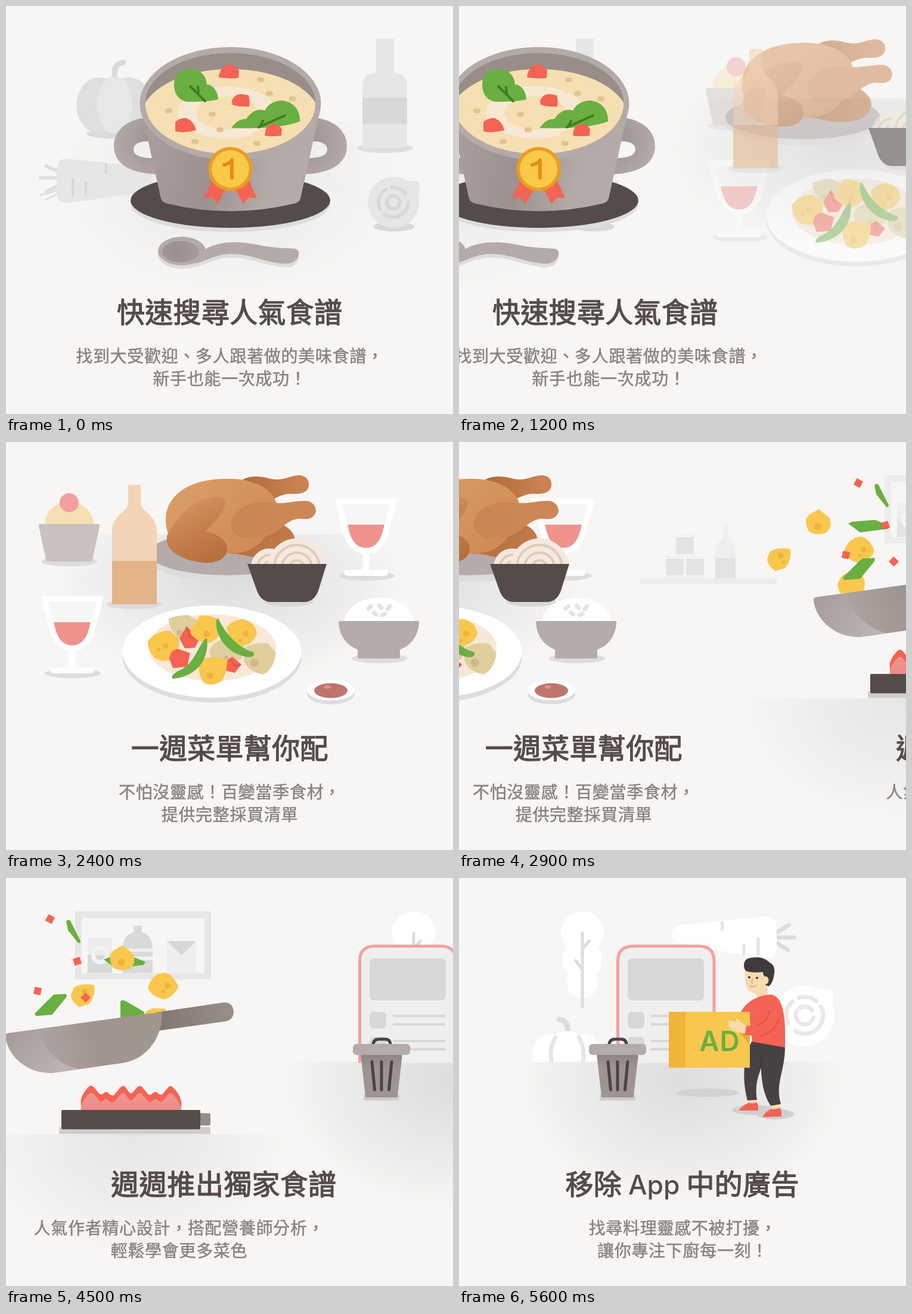
Write an HTML page with a canvas that moves like this. It is 750 px wide and 686 px high and loops after 6000 ms.

```html
<!DOCTYPE html>
<html lang="zh-Hant">
<head>
<meta charset="utf-8">
<style>
html, body { margin: 0; width: 100%; height: 100%; overflow: hidden; background: #f7f6f4; }
canvas { display: block; }
</style>
</head>
<body>
<canvas id="stage" width="750" height="686"></canvas>
<script>
const W = 750, H = 686, LOOP = 6000, BG = '#f7f6f4';
const DARK = '#554c49', TAUPE = '#b4aaa7', RED = '#f46353', GREEN = '#6aaf41', YELLOW = '#f9c74e', GOLD = '#eeb43c', SHADE = '#dddcde';
const CJK = '"Noto Sans CJK TC", "Noto Sans CJK", sans-serif';
const stage = document.getElementById('stage').getContext('2d');
let c = stage;

// Drawing helpers
function fill(d, color) { c.fillStyle = color; c.fill(new Path2D(d), 'evenodd'); }
function line(d, color, width, cap = 'round') {
  c.strokeStyle = color; c.lineWidth = width; c.lineCap = cap; c.lineJoin = 'round';
  c.stroke(new Path2D(d));
}
function oval(x, y, rx, ry, color) {
  c.fillStyle = color; c.beginPath(); c.ellipse(x, y, rx, ry, 0, 0, 7); c.fill();
}
const dot = (x, y, r, color) => oval(x, y, r, r, color);
function box(x, y, w, h, color, r = 0) {
  c.fillStyle = color; c.beginPath(); c.roundRect(x, y, w, h, r); c.fill();
}
function arc(x, y, r, from, to, color, width) {
  c.strokeStyle = color; c.lineWidth = width; c.lineCap = 'round';
  c.beginPath(); c.arc(x, y, r, from, to); c.stroke();
}
function stops(g, colors) {
  colors.forEach((s, i) => g.addColorStop(i / (colors.length - 1), s));
  return g;
}
const lin = (x0, y0, x1, y1, ...colors) => stops(c.createLinearGradient(x0, y0, x1, y1), colors);
const rad = (x, y, r, ...colors) => stops(c.createRadialGradient(x, y, 0, x, y, r), colors);
function at(x, y, draw) { c.save(); c.translate(x, y); draw(); c.restore(); }
function clipBox(x, y, w, h, draw) {
  c.save(); c.beginPath(); c.rect(x, y, w, h); c.clip(); draw(); c.restore();
}
function floor(top, cy, rx, ry, tone) {
  clipBox(0, top, W, H - top, () => at(375, cy, () => {
    c.scale(rx, ry);
    dot(0, 0, 1, rad(0, 0, 1, `rgba(${tone},1)`, `rgba(${tone},.55)`, `rgba(${tone},0)`));
  }));
}
// The bold parameter thickens regular glyphs by an outline of that width
function text(s, x, y, size, color, { space = 0, align = 'center', family = CJK, weight = 400, bold = 0 }) {
  c.font = `${weight} ${size}px ${family}`;
  c.letterSpacing = space + 'px';
  c.textAlign = align;
  c.fillStyle = c.strokeStyle = color;
  c.lineWidth = bold; c.lineJoin = 'round';
  c.fillText(s, x, y);
  if (bold) c.strokeText(s, x, y);
}
const TITLE = { space: 0.3, bold: 1.3 };
const title = s => () => text(s, 375.2, 532, 47, DARK, TITLE);
const lines = (a, b) => () => [a, b].forEach((s, i) =>
  text(s, 375.5, 598.5 + i * 38.5, 28, '#8a817e', { space: 0.7, bold: 0.5 }));

// Search slide
function greyFood() {
  oval(185, 215, 50, 8, '#dadada');
  oval(157, 167, 39, 47, '#dfdfdf');
  oval(206, 167, 39, 47, '#dfdfdf');
  oval(182, 166, 30, 48, '#e7e7e7');
  line('M182 116Q181 97 197 95', '#dadada', 9);
  line('M86 277L67 269M86 289H58M86 303L68 312', '#dedede', 6);
  line('M86 310L58 318M86 316L66 326', '#dedede', 3);
  fill('M104 257L245 272V311L106 331Q85 333 85 312V276Q86 255 104 257Z', '#e6e6e6');
  line('M112 291V319M134 297V317M168 266V281', '#d8d8d8', 4);
  oval(636, 239, 47, 8, '#dedede');
  fill('M621 55H651V112Q673 114 673 134V238H598V134Q598 114 621 112Z', '#e6e6e6');
  box(598, 154, 75, 44, '#d8d8d8');
  oval(651, 371, 35, 8, '#d9d9d9');
  dot(650, 330, 43, '#e6e6e6');
  fill('M660 295L691 294Q695 296 693 318Z', '#e6e6e6');
  const ring = '#d8d8d8';
  arc(650, 330, 25, 2.7, 4.2, ring, 6); arc(650, 330, 25, 4.6, 5.7, ring, 6); arc(650, 330, 25, 0, 2.2, ring, 6);
  arc(650, 330, 11, -0.2, 3.6, ring, 6); arc(650, 330, 11, 4.1, 5.6, ring, 6);
}
function spoonShape(dy, color) {
  at(0, dy, () => {
    oval(295, 412, 40, 24, color);
    fill('M320 396L334 409C360 393 398 396 425 402C450 407 470 407 484 408Q493 409 491 419Q485 435 465 433C430 430 410 416 375 417C350 418 338 428 318 433Z', color);
  });
}
function spoon() {
  spoonShape(6, SHADE);
  spoonShape(0, TAUPE);
  oval(293, 413, 31, 18, rad(285, 414, 34, '#998e8b', '#a59a97'));
}
function soup() {
  oval(376.5, 334, 167, 46, SHADE);
  oval(376.5, 327, 167.5, 46, DARK);
  const handle = 'M252 187C207 185 181 208 181 235C181 266 209 283 260 283ZM245 228C224 226 214 232 214 241C214 251 226 256 250 256Z';
  const grip = () => fill(handle, rad(255, 225, 75, '#998e8b', TAUPE));
  grip();
  at(753, 0, () => { c.scale(-1, 1); grip(); });
  fill('M226 170L260 324Q262 330 270 332Q376 358 484 332Q492 330 494 324L528 170Z', lin(245, 250, 440, 290, '#a89d9a', '#9c918e', TAUPE));
  oval(376.5, 164, 152, 95, TAUPE);
  c.save();
  c.beginPath(); c.ellipse(376.5, 164, 143, 85, 0, 0, 7); c.clip();
  box(220, 70, 320, 190, '#998d89');
  oval(376.5, 188, 150, 82, '#f5dfb3');
  oval(371, 179, 83, 44, '#f7e8d3');
  oval(371, 180, 52, 28, '#f5dfb3');
  fill('M410 214Q444 202 455 182L470 205L430 230Z', '#f5dfb3');
  [[427, 124], [442, 147], [481, 156], [273, 176], [346, 182], [359, 208], [317, 228], [421, 231]]
    .forEach(([x, y]) => box(x - 6, y - 4, 12, 8, '#e2c48b', 4));
  c.restore();
  fill('M282 133C282 116 293 106 309 106C325 106 336 116 337 132C348 132 356 145 356 157C342 161 320 161 303 161C290 158 282 148 282 133Z', GREEN);
  line('M309 135L334 160M322 136L323 146', '#3f7d22', 4);
  fill('M378 205C388 192 395 190 403 190C412 176 425 172 434 176C440 164 452 159 463 159C485 161 494 178 493 194C470 203 430 207 378 205Z', GREEN);
  line('M468 184L424 204M431 193L426 203', '#3f7d22', 4);
  ['M357 120C358 108 366 98 375 98Q388 102 391 109L390 121Q374 123 357 120Z',
   'M379 159Q384 148 394 148L407 150Q410 160 408 169Q392 170 380 166Z',
   'M284 195Q290 189 302 188Q316 194 319 209Q300 214 284 211Z',
   'M435 211Q437 200 448 198Q459 199 463 207L462 218Q447 220 434 218Z'].forEach(d => fill(d, RED));
  const ribbon = () => fill('M345 294L332 323L346 322L355 333L372 300Z', RED);
  ribbon();
  at(753, 0, () => { c.scale(-1, 1); ribbon(); });
  dot(376.5, 274, 37, '#e99d20');
  dot(376.5, 274, 31.5, '#fac94a');
  line('M366 267Q376 265 379 259V289', '#e58d14', 6);
}

// Menu slide
function chicken() {
  oval(370, 197, 130, 38, SHADE);
  oval(370, 187, 130, 37, '#b5abaa');
  fill('M390 70C400 55 425 56 445 62C465 66 475 57 490 56C504 56 509 64 508 74C506 85 495 88 480 87C460 86 445 100 425 106Z', lin(410, 80, 490, 70, '#b46c3c', '#c98250'));
  fill('M375 180C385 140 420 130 450 134C475 140 486 155 485 168C480 190 455 196 430 195C408 195 395 186 375 188Z', lin(400, 140, 480, 190, '#b46c3c', '#c47d4b'));
  fill('M268 130C268 95 300 63 365 62C415 60 448 78 455 106L440 150C425 180 400 190 365 187L330 200C300 200 268 170 268 130Z', lin(300, 80, 400, 190, '#d99c66', '#cf8b56'));
  fill('M377 138C385 105 420 97 445 102C470 105 480 99 500 99C512 98 520 106 520 116C518 128 508 131 495 129C470 127 460 155 430 160C395 167 377 155 377 138Z', lin(385, 150, 500, 105, '#cb8553', '#cd8757'));
  fill('M270 158C285 125 320 92 350 92C368 92 371 100 366 110C358 130 338 145 335 150C355 155 372 165 371 180C370 200 345 206 325 202C300 199 265 185 270 158Z', lin(300, 110, 345, 200, '#d1905c', '#c47d4a', '#b76e3d'));
}
function bottleAndBowl() {
  oval(215, 273, 47, 8, SHADE);
  fill('M205 72H226V102C226 118 253 122 253 150V273H178V150C178 122 205 118 205 102Z', '#f3d4b6');
  box(178, 200, 75, 73, '#e3b389');
  oval(474, 268, 42, 9, '#d8d6d9');
  clipBox(400, 155, 140, 51, () => {
    [[442, 210, 31, 20, 9], [488, 211, 49, 38, 25, 12]].forEach(([x, y, r, ...rings]) => {
      dot(x, y, r, '#f4e9df');
      rings.forEach(q => arc(x, y, q, 0, 7, '#dfcbb6', 4));
    });
  });
  fill('M405 205H538L524 250Q517 269 500 269H445Q428 269 421 250Z', DARK);
}
function plate() {
  oval(345.5, 361, 150, 77, SHADE);
  oval(345.5, 352.5, 150, 77.5, '#fff');
  oval(346, 346, 107, 56, '#f7e8d7');
  ['M273 297Q290 290 306 291L322 300L318 330Q300 340 285 325Q272 312 273 297Z',
   'M341 351Q350 332 372 330L400 340L395 365Q375 372 345 366Z',
   'M400 346Q420 335 440 339L453 355Q448 385 430 391Q405 385 399 367Z'].forEach(d => fill(d, '#e1ce9d'));
  [[291, 321, 5], [417, 371, 7], [370, 363, 4]].forEach(([x, y, r]) => dot(x, y, r, '#cfb98a'));
  fill('M291 330L303 310L325 330L317 346L300 347Z', RED);
  line('M303 311L309 329L322 331', '#dd5146', 2);
  ['M238 335Q250 318 275 317L290 330Q292 355 280 365Q262 372 248 362Q238 350 238 335Z',
   'M309 319L325 292Q345 290 358 300Q365 330 340 338Q315 335 309 319Z',
   'M370 312Q380 298 398 298Q418 303 421 322Q415 340 395 343Q375 340 370 312Z'].forEach(d => fill(d, YELLOW));
  fill('M274 364Q276 348 290 348L309 355L304 378L280 380Z', RED);
  fill('M364 372L380 361L395 374L384 388L366 384Z', RED);
  line('M376 365L383 376L393 375', '#dd5146', 2);
  fill('M323 375Q330 360 350 362L371 366Q372 385 362 402Q345 412 332 405Q324 395 323 375Z', YELLOW);
  [[268, 343, 5], [256, 349, 3.5], [337, 323, 6], [402, 322, 5], [393, 334, 3], [342, 393, 6]]
    .forEach(([x, y, r]) => dot(x, y, r, GOLD));
  fill('M337 330C342 365 320 395 279 398C276 392 284 387 295 382C315 372 322 345 334 331Z', GREEN);
  fill('M356 296C365 318 390 348 415 353C420 362 408 364 395 359C365 350 350 320 353 299Z', GREEN);
  oval(545, 424, 40, 17, SHADE);
  oval(545, 417.5, 40, 17, '#fff');
  oval(545, 418, 28, 12.5, '#bd756c');
  oval(539, 412, 5.5, 3, '#d59a92');
}
function glass() {
  oval(605, 225, 47, 8, SHADE);
  fill('M557 100H651L638 150Q630 183 604 183Q578 183 570 150Z', BG);
  fill('M573 139H635Q628 179 604 179Q580 179 573 139Z', '#f0938d');
  line('M557 100H651L638 148Q630 183 604 183Q578 183 570 148Z', '#fff', 10);
  line('M604 183V218', '#fff', 11);
  line('M572 220H636', '#fff', 10);
}
function tableware() {
  oval(106, 201, 47, 8, SHADE);
  clipBox(0, 0, W, 140, () => oval(106, 139, 41, 39, '#f5e0b3'));
  dot(106, 102, 16, '#f39f9d');
  fill('M57 138H155Q158 138 157 142L145 198Q144 201 141 201H71Q68 201 67 198L55 142Q55 138 57 138Z', '#cac2c0');
  glass();
  at(-493, 164, glass);
  oval(627, 364, 47, 8, SHADE);
  clipBox(0, 0, W, 302, () => oval(626, 302, 58, 40, '#fff'));
  line('M608 280L612 276M626 275L630 279M640 281L644 276M617 287L621 290M631 291L636 289', '#e4e3e5', 7);
  fill('M558 304Q558 301 561 301H691Q694 301 693 306C690 333 673 345 661 349V361Q661 364 658 364H593Q590 364 590 361V349C575 343 560 330 558 304Z', '#b5abaa');
}

// Weekly slide
function jar(x, y) {
  box(x, y, 30, 37, '#efefef');
  box(x, y + 5, 30, 27, '#dadada');
  box(x, y + 5, 30, 2, '#cfcfcf');
}
function shelves() {
  jar(116, 156); jar(99, 192); jar(133, 192);
  fill('M195 137H204V156C204 165 216 168 216 182V229H182V182C182 168 195 165 195 156Z', '#ececec');
  box(182, 195, 34, 34, '#d8d8d8');
  box(56, 229, 229, 9.5, '#e6e6e6');
  box(466, 56, 228, 114.5, '#e7e7e7');
  box(477, 67, 206, 93.5, '#f7f6f5');
  box(487, 101, 41, 59, '#ececec');
  box(487, 129, 41, 31, '#d9d9d9');
  dot(508, 130, 15, '#f4f4f4');
  dot(508, 130, 8, '#d9d9d9');
  box(499, 121, 18, 9, '#ececec');
  fill('M564 80H578V91Q596 97 596 118V160H546V118Q546 97 564 91Z', '#dadada');
  box(546, 119, 50, 5, '#f0f0f0'); box(546, 132, 50, 6, '#f0f0f0');
  box(620, 106, 49, 54, '#eeeeee');
  fill('M620 106H669L645 130Z', '#d8d8d8');
}
const backBean = () => fill('M256 137L263 134L301 131L326 141L323 146L276 152Z', GREEN);
function squash() {
  ['M297 130L303 122L319 113L337 128Q342 145 330 153Q312 158 302 150Q297 142 297 130Z',
   'M237 184Q250 176 271 180Q273 200 262 212L246 217Q232 208 232 196Z',
   'M361 185Q368 160 390 159Q405 163 412 183Q405 200 388 204Q368 200 361 185Z',
   'M350 240Q355 222 370 219L391 220L396 236L394 254H354Z'].forEach(d => fill(d, YELLOW));
  [[317, 142, 6], [255, 191, 5], [259, 202, 3], [394, 181, 5], [387, 191, 3]]
    .forEach(([x, y, r]) => dot(x, y, r, GOLD));
}
function pan() {
  ['M337 73Q340 68 344 72L361 106Q361 111 357 109L340 88Z',
   'M284 228L316 196L337 195Q339 198 336 202L313 230L286 232Z',
   'M428 207Q432 204 437 207L468 225L466 240H428Z'].forEach(d => fill(d, GREEN));
  [[310, 69, 0.5], [355.5, 140, -0.3], [289, 190, 0.2], [369.5, 201, 0.75]].forEach(([x, y, a]) =>
    at(x, y, () => { c.rotate(a); box(-6, -6, 12, 12, RED); }));
  fill('M488 226L600 209.5Q616 208 618 224Q618 238 605 241L490 257Z', lin(500, 0, 610, 0, '#837873', '#988d87'));
  fill('M235 265Q235 262 239 261L497 225C501 262 475 305 432 311L320 327C275 333 238 300 235 265Z', lin(300, 290, 480, 250, '#aca2a0', '#a0958f', '#a2978f'));
  fill('M235 265Q235 262 239 261L292 254C298 288 322 312 358 321.5L320 327C275 333 238 300 235 265Z', lin(250, 260, 330, 325, '#a89d9a', '#bbb4b1'));
}
function stove() {
  const flame = 'M289 405V390Q284 375 289 366Q295 355 301 350Q304 348 308 351L317 362Q321 366 326 361Q329 358 333 362Q338 367 342 365L354 351Q357 348 361 351L368 361Q370 363 373 361L382 351Q385 348 389 351L400 364Q404 366 408 361Q412 358 415 361Q421 367 424 363L434 351Q437 348 441 352Q460 370 454 390V405Z';
  clipBox(0, 0, W, 392, () => {
    fill(flame, RED);
    at(0, 12, () => fill(flame, lin(0, 350, 0, 380, '#ee9590', '#f08a87')));
  });
  box(250, 419, 254, 11.5, '#cfcdcd', 2);
  box(484, 395.5, 20, 20.5, '#978c87', 2);
  box(254, 390, 233, 32.5, DARK, 2);
}

// Ad-free slide
function whiteFood() {
  const grey = '#dcdcdc';
  dot(207, 92, 36, '#fff'); dot(207, 137, 33, '#fff'); dot(207, 176, 26, '#fff');
  line('M207 93V216M207 120L218 106M207 154L196 139', grey, 5);
  line('M533 92L553 79M533 100H562M533 109L552 121', grey, 7);
  fill('M372 79L510 65Q533 63 533 85V118Q532 139 512 136L372 110Q357 107 357 95Q357 82 372 79Z', '#fff');
  line('M441.500 73V88M478 111V130M502 100V130', '#e4e4e4', 5, 'butt');
  line('M182 260Q184 239 168 238', grey, 9);
  clipBox(0, 0, W, 309, () => {
    oval(151, 303, 28, 41, '#fff'); oval(181, 302, 36, 45, '#fff'); oval(211, 303, 27, 41, '#fff');
    line('M162 268Q149 290 157 315M201 268Q214 290 206 315', '#e6e6e6', 7);
  });
  dot(579, 232, 51, '#fff');
  fill('M595 188L626 187Q630 189 626 220Z', '#fff');
  const ring = '#e9e9e9';
  arc(580, 231, 31, -0.5, 2.1, ring, 7); arc(580, 231, 31, 2.7, 4, ring, 7); arc(580, 231, 31, 4.4, 5.4, ring, 7);
  arc(580, 231, 15, 0.2, 3.7, ring, 7); arc(580, 231, 15, 4.2, 5.7, ring, 7);
}
function phone() {
  const frame = 'M266.500 311V140Q266.500 114.500 292 114.500H402Q428 114.500 428 140V311';
  fill(frame, '#efefef');
  box(283, 135, 128, 71, '#d8d8d8', 8);
  [225, 267].forEach(y => {
    box(283, y, 28, 28, '#d8d8d8', 7);
    line(`M322 ${y + 7}H410M322 ${y + 21}H410`, '#d8d8d8', 4, 'butt');
  });
  line(frame, '#f4a19f', 5, 'butt');
}
function trash() {
  box(236, 364, 60, 10, '#cfcdcd', 2);
  line('M252 281Q252 271 262 271H272Q281 271 281 281', '#4a4341', 5);
  fill('M231 296H301L293 367Q293 369 290 369H242Q239 369 239 367Z', lin(0, 297, 0, 320, '#8f8481', '#9f9491'));
  box(218, 279, 96, 18.5, '#b5abaa', 6);
  line('M250 309L254.500 356M266 309V356M283 309L278.500 356', '#4c4442', 5);
}
function man() {
  const skin = '#f9dbb0', trousers = '#474142', hair = '#3f3a3b';
  oval(417, 361, 53, 7, '#d2d2d4');
  oval(495, 390, 37, 8.5, '#d0d0d2');
  oval(531, 397, 31, 9, '#d0d0d2');
  fill('M486 372L499 372L500 381H487ZM522 381L538 379L539 390H525Z', skin);
  fill('M470 391Q472 384 486 378Q494 380 500 377Q503 385 502 391Z', RED);
  fill('M510 402Q512 394 524 388Q532 390 539 386Q542 394 541 401Z', RED);
  fill('M491 275C478 300 474 335 484 374L500 373C496 348 502 330 512 308V278Z', trousers);
  fill('M491 275L547 284C547 325 530 345 540 380L523 383C508 360 506 330 507 297Z', trousers);
  line('M507 298V318', '#373233', 1.5);
  fill('M495 182L517 176L518 198Q506 205 498 198Z', skin);
  fill('M472 227C482 208 500 197 524 196C543 199 549 230 547 285L492 275L488 240Z', RED);
  box(352, 225, 30, 94, '#f0b437');
  box(380, 225, 108, 94, YELLOW);
  fill('M468 258L488 262V280Z', '#e2ab3c');
  text('AD', 437.5, 291, 46, GREEN, { space: 1, family: 'Inter, sans-serif', weight: 600 });
  fill('M520 206C534 200 544 222 538 236C530 256 518 264 500 265L479 264L481 249L500 247C514 240 512 222 520 206Z', RED);
  line('M521 223Q517 242 500 248M538 234Q530 260 506 265', '#d94f42', 1.5);
  fill('M482 249L467 237Q464 236 465 240L469 243L455 239Q451 239 453 243Q449 245 453 248Q451 252 457 254Q466 261 480 261Z', skin);
  fill('M480 152Q478 184 487 191Q500 198 509 190Q519 180 518 160V150Z', skin);
  fill('M478 148Q478 134 492 134Q510 131 521 142Q531 147 529 160Q527 177 520 182L514 180Q519 172 515 166Q510 165 510 158Q490 160 481 156Q478 152 478 148Z', hair);
  oval(515, 172, 4.5, 6.5, skin);
  dot(487, 167, 2, hair); dot(500, 168, 2, hair);
  line('M493 169L490.500 176L493 177M487 181Q495 185 500 180', '#d9a673', 1.5);
}
function appTitle() {
  const left = { ...TITLE, align: 'left' };
  text('移除', 178.5, 532, 47, DARK, left);
  text('App', 284, 532, 44.5, DARK, { align: 'left', family: 'Inter, sans-serif', weight: 500 });
  text('中的廣告', 381.5, 532, 47, DARK, left);
}

// Each layer: drawing, travel on entry, travel on exit, fade-in rate, exit power
function layer(draw, enter, leave, fade, power = 1) {
  const image = document.createElement('canvas');
  image.width = W; image.height = H;
  c = image.getContext('2d');
  draw();
  return { image, enter, leave, fade, power };
}
const slides = [
  [
    layer(() => floor(195, 290, 280, 190, '233,233,234'), 0, 2550, 3),
    layer(greyFood, 0, 2550, 3),
    layer(soup, 0, 1458, 3),
    layer(spoon, 0, 1944, 3),
    layer(title('快速搜尋人氣食譜'), 0, 780, 3),
    layer(lines('找到大受歡迎、多人跟著做的美味食譜，', '新手也能一次成功！'), 0, 745, 3)
  ], [
    layer(() => floor(155, 235, 290, 170, '221,221,223'), 320, 2100, 5),
    layer(tableware, 431, 1954, 2.5),
    layer(chicken, 248, 1609, 3.1),
    layer(bottleAndBowl, 338, 1609, 3.3),
    layer(plate, 384, 1777, 2.7),
    layer(title('一週菜單幫你配'), 750, 756, 9),
    layer(lines('不怕沒靈感！百變當季食材，', '提供完整採買清單'), 750, 756, 9)
  ], [
    layer(() => floor(431, 440, 250, 190, '230,230,231'), 461, 1416, 4.6),
    layer(shelves, 318, 3080, 2.8),
    layer(backBean, 508, 814, 4.6),
    layer(squash, 365, 1088, 4.6),
    layer(pan, 461, 2080, 4.6),
    layer(stove, 559, 1416, 4.6),
    layer(title('週週推出獨家食譜'), 701, 750, 9, 2),
    layer(lines('人氣作者精心設計，搭配營養師分析，', '輕鬆學會更多菜色'), 750, 750, 9)
  ], [
    layer(() => floor(309, 340, 270, 210, '221,221,222'), 411, 0, 9),
    layer(whiteFood, 538, 0, 9),
    layer(phone, 369, 0, 9),
    layer(trash, 411, 0, 9),
    layer(man, 520, 0, 9),
    layer(appTitle, 750, 0, 9),
    layer(lines('找尋料理靈感不被打擾，', '讓你專注下廚每一刻！'), 750, 0, 9)
  ]
];
c = stage;

const swipes = [992, 2672, 4317], SWIPE = 600, STEP = 100;
const ease = u => u < 0.5 ? 4 * u ** 3 : 1 - 4 * (1 - u) ** 3;

function paint(index, shift, alpha = () => 1) {
  for (const l of slides[index]) {
    stage.globalAlpha = alpha(l);
    stage.drawImage(l.image, Math.round(shift(l)), 0);
  }
  stage.globalAlpha = 1;
}
function render(t) {
  stage.fillStyle = BG;
  stage.fillRect(0, 0, W, H);
  const started = swipes.filter(s => t > s).length;
  const u = started ? (t - swipes[started - 1]) / SWIPE : 1;
  if (u >= 1) return paint(started, () => 0);
  const p = ease(u);
  paint(started, l => (1 - p) * l.enter, l => Math.min(1, p * l.fade));
  paint(started - 1, l => -l.leave * p ** l.power);
}
const start = performance.now();
function tick() {
  const t = (performance.now() - start) % LOOP;
  render(Math.floor(t / STEP) * STEP);
  requestAnimationFrame(tick);
}
tick();
</script>
</body>
</html>
```
